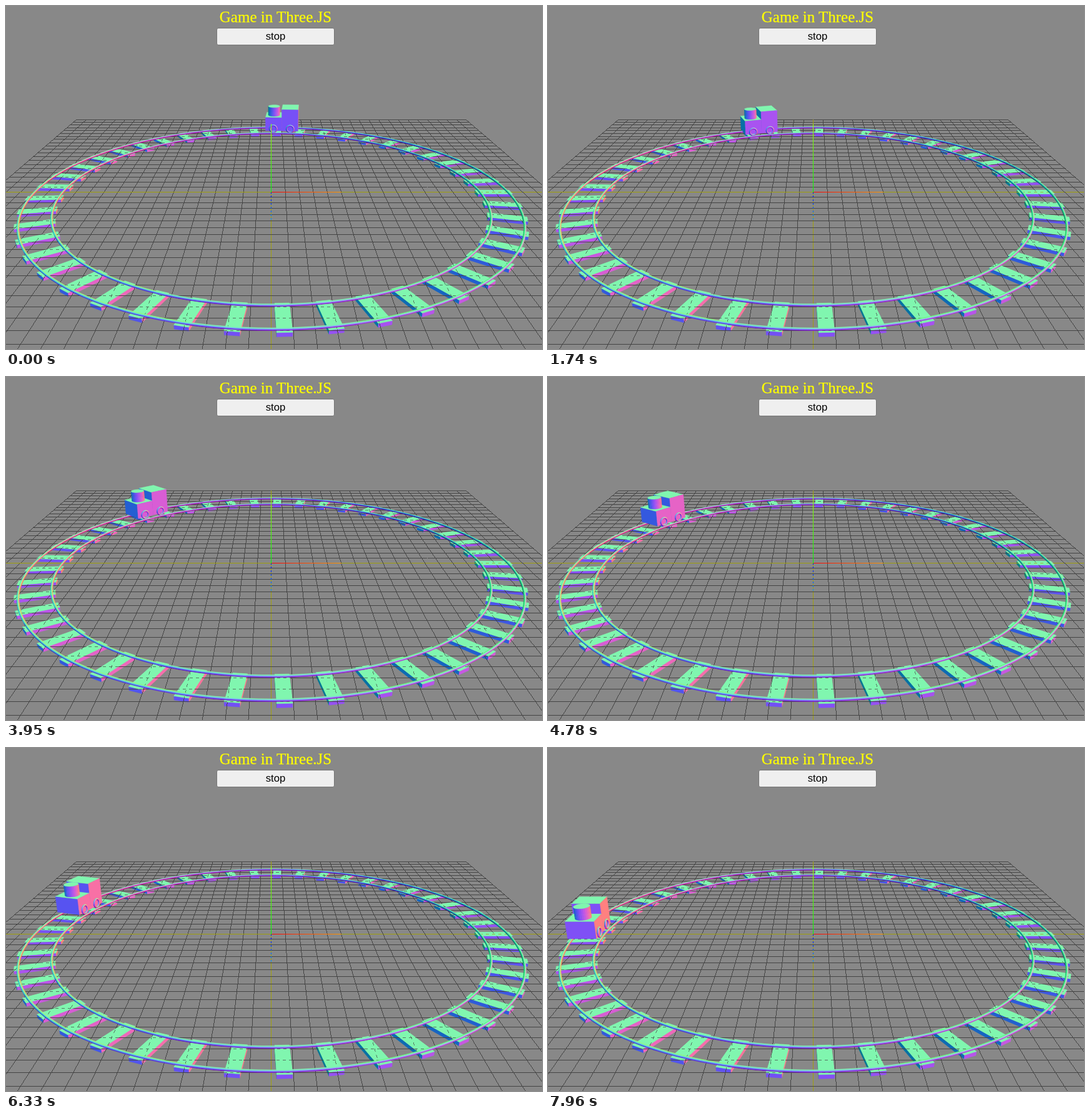
These frames come from a looping animation (858x550 px, 8000 ms). An HTML page with a canvas:

```html
<!DOCTYPE html>
<html lang="en">
<head>
<meta charset="utf-8">
<title>Game in Three.JS</title>
<style>
  html, body { margin: 0; width: 100%; height: 100%; overflow: hidden; background: #888; }
  canvas { position: absolute; left: 0; top: 0; display: block; }
  h1 {
    position: absolute; left: 331px; top: 3.5px; width: 201px; margin: 0;
    text-align: center; white-space: nowrap; color: #ff0;
    font: 25px/28px "Liberation Serif", serif; -webkit-text-stroke: 0.25px #ff0;
  }
  button {
    position: absolute; left: 337px; top: 35px; width: 189px; height: 28px; padding: 0;
    box-sizing: border-box; border: 1px solid #767676; border-radius: 3px;
    background: #efefef; color: #000; font: 16.67px "Liberation Sans", sans-serif;
  }
</style>
</head>
<body>
<canvas id="stage" width="858" height="550"></canvas>
<h1>Game in Three.JS</h1>
<button type="button">stop</button>
<script>
const WIDTH = 858, HEIGHT = 550, LOOP = 8000;
const CENTER_X = 424.9, CENTER_Y = 298.2, FOCAL = 962;
const EYE = [0, 16, 40];
const DIST = Math.hypot(...EYE), SIN = EYE[1] / DIST, COS = EYE[2] / DIST;
const TRACK = 16, GRID = 20, TAU = Math.PI * 2;

const project = ([x, y, z]) => {
  const scale = FOCAL / (DIST - y * SIN - z * COS);
  return [CENTER_X + x * scale, CENTER_Y - (y * COS - z * SIN) * scale];
};

// View-space normal mapped to RGB.
const normalColor = ([x, y, z]) => {
  const view = [x, y * COS - z * SIN, y * SIN + z * COS];
  return `rgb(${view.map(v => Math.round((v + 1) * 127.5)).join()})`;
};

const trace = (g, points) => {
  points.map(project).forEach(([x, y], i) => i ? g.lineTo(x, y) : g.moveTo(x, y));
};

function face(g, points, normal) {
  const facing = normal.reduce((sum, n, i) => sum + n * (EYE[i] - points[0][i]), 0);
  if (facing <= 0) return;
  g.beginPath();
  trace(g, points);
  g.closePath();
  g.fillStyle = g.strokeStyle = normalColor(normal);
  g.lineWidth = 0.4;
  g.fill();
  g.stroke();
}

const worldFrame = { point: p => p, dir: p => p };

// Local axes on the track: forward, up, outward.
function trackFrame(degrees) {
  const a = degrees * Math.PI / 180, s = Math.sin(a), c = Math.cos(a);
  const dir = ([u, y, v]) => [-u * c - v * s, y, u * s - v * c];
  return { dir, point: ([u, y, v]) => dir([u, y, v + TRACK]) };
}

function box(g, frame, min, max) {
  for (let axis = 0; axis < 3; axis++) {
    const b = (axis + 1) % 3, c = (axis + 2) % 3;
    for (const side of [-1, 1]) {
      const corner = (hiB, hiC) => {
        const p = [];
        p[axis] = side > 0 ? max[axis] : min[axis];
        p[b] = hiB ? max[b] : min[b];
        p[c] = hiC ? max[c] : min[c];
        return frame.point(p);
      };
      const normal = [0, 0, 0];
      normal[axis] = side;
      face(g, [corner(0, 0), corner(1, 0), corner(1, 1), corner(0, 1)], frame.dir(normal));
    }
  }
}

// Ring around local axis `axis`; the ring plane uses axis 0 and the remaining one.
function torus(g, frame, center, axis, radius, tube, segments, sides) {
  const other = 3 - axis;
  const normalAt = (i, j) => {
    const t = i / segments * TAU, p = j / sides * TAU, n = [];
    n[0] = Math.cos(p) * Math.cos(t);
    n[other] = Math.cos(p) * Math.sin(t);
    n[axis] = Math.sin(p);
    return n;
  };
  const pointAt = (i, j) => {
    const t = i / segments * TAU, n = normalAt(i, j);
    const p = center.map((c, k) => c + n[k] * tube);
    p[0] += radius * Math.cos(t);
    p[other] += radius * Math.sin(t);
    return frame.point(p);
  };
  for (let i = 0; i < segments; i++) {
    for (let j = 0; j < sides; j++) {
      const quad = [pointAt(i, j), pointAt(i + 1, j), pointAt(i + 1, j + 1), pointAt(i, j + 1)];
      face(g, quad, frame.dir(normalAt(i + 0.5, j + 0.5)));
    }
  }
}

function cylinder(g, frame, [u, v], radius, bottom, top) {
  const n = 28, rim = [];
  const at = (i, y) => {
    const t = i / n * TAU;
    return frame.point([u + radius * Math.cos(t), y, v + radius * Math.sin(t)]);
  };
  for (let i = 0; i < n; i++) {
    const t = (i + 0.5) / n * TAU;
    const quad = [at(i, bottom), at(i + 1, bottom), at(i + 1, top), at(i, top)];
    face(g, quad, frame.dir([Math.cos(t), 0, Math.sin(t)]));
    rim.push(at(i, top));
  }
  face(g, rim, [0, 1, 0]);
}

// Hard-edged line, one pixel per step, optionally dashed.
function line(g, from, to, color, dash = 0) {
  const [x0, y0] = project(from), [x1, y1] = project(to);
  const dx = x1 - x0, dy = y1 - y0;
  const steps = Math.round(Math.max(Math.abs(dx), Math.abs(dy)));
  g.fillStyle = color;
  for (let i = 0; i <= steps; i++) {
    if (dash && i % (2 * dash) >= dash) continue;
    g.fillRect(Math.floor(x0 + dx * i / steps), Math.floor(y0 + dy * i / steps), 1, 1);
  }
}

function grid(g, dash) {
  for (let i = -GRID; i <= GRID; i++) {
    const color = i ? '#444' : '#a0a00c';
    line(g, [i, 0, -GRID], [i, 0, GRID], color, dash);
    line(g, [-GRID, 0, i], [GRID, 0, i], color, dash);
  }
}

function axis(g, end, from, to, dash) {
  const fade = g.createLinearGradient(...project([0, 0, 0]), ...project(end));
  fade.addColorStop(0, from);
  fade.addColorStop(1, to);
  line(g, [0, 0, 0], end, fade, dash);
}

const rail = (g, radius) => torus(g, worldFrame, [0, 0.03, 0], 1, radius, 0.065, 160, 10);

function layer(paint) {
  const canvas = document.createElement('canvas');
  canvas.width = WIDTH;
  canvas.height = HEIGHT;
  paint(canvas.getContext('2d'));
  return canvas;
}

const ground = layer(g => {
  g.fillStyle = '#888';
  g.fillRect(0, 0, WIDTH, HEIGHT);
  const half = 0.36, inner = -1.3, outer = 1.15;
  const frames = Array.from({ length: 45 }, (_, i) => trackFrame(i * 8 - 2));
  for (const frame of frames) box(g, frame, [-half, -0.22, inner], [half, 0, outer]);
  grid(g);

  // The sleeper tops lie in the grid plane, so lines show through them in dashes.
  const tops = frames.map(({ point }) =>
    [[-half, 0, inner], [half, 0, inner], [half, 0, outer], [-half, 0, outer]].map(point));
  tops.forEach(top => face(g, top, [0, 1, 0]));
  g.save();
  g.beginPath();
  tops.forEach(top => { trace(g, top); g.closePath(); });
  g.clip();
  g.globalAlpha = 0.7;
  grid(g, 5);
  g.restore();

  axis(g, [5, 0, 0], '#f00', '#f90');
  axis(g, [0, 0, 5], '#00f', '#09f', 3);
  rail(g, 16.92);
});

const front = layer(g => {
  rail(g, 14.92);
  axis(g, [0, 5, 0], '#0f0', '#9f0');
});

function train(g, degrees) {
  const frame = trackFrame(degrees);
  const wheels = v => {
    for (const u of [-0.8, 0.8]) torus(g, frame, [u, 0.45, v], 2, 0.33, 0.06, 20, 8);
  };
  const cabin = () => box(g, frame, [-1.53, 0.25, -1], [0, 2.3, 1]);
  const nose = () => {
    box(g, frame, [0, 0.25, -1], [1.53, 1.53, 1]);
    cylinder(g, frame, [0.78, 0], 0.54, 1.53, 2.38);
  };
  const origin = frame.point([0, 0, 0]), forward = frame.dir([1, 0, 0]);
  const seenFromFront = forward.reduce((sum, f, i) => sum + f * (EYE[i] - origin[i]), 0) > 0;
  wheels(1);
  (seenFromFront ? [cabin, nose] : [nose, cabin]).forEach(part => part());
  wheels(-1);
}

// [step, degrees along the track]
const POSES = [[0, -3.7], [12, 7.8], [27, 18.8], [123, 90]];

function angleAt(time) {
  const step = Math.min(123, Math.max(0, Math.floor((time - 42) / 64.8) + 1));
  const i = Math.max(1, POSES.findIndex(([s]) => s >= step));
  const [s0, a0] = POSES[i - 1], [s1, a1] = POSES[i];
  return a0 + (a1 - a0) * (step - s0) / (s1 - s0);
}

const stage = document.getElementById('stage').getContext('2d');
const start = performance.now();

function draw() {
  const time = Math.max(0, performance.now() - start) % LOOP;
  stage.drawImage(ground, 0, 0);
  train(stage, angleAt(time));
  stage.drawImage(front, 0, 0);
  requestAnimationFrame(draw);
}
draw();
</script>
</body>
</html>
```
